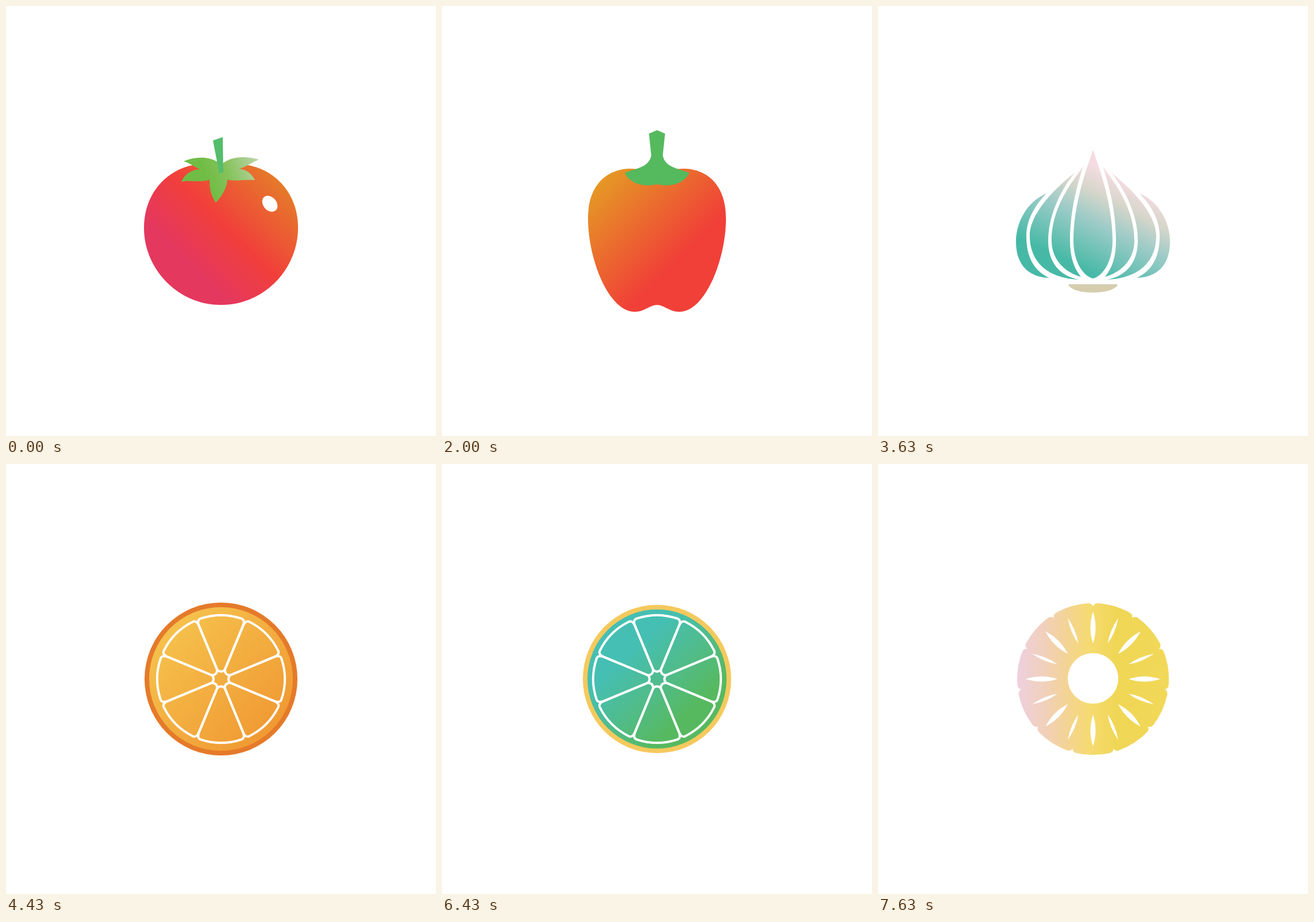
Animation of 748x748 px, one loop 8000 ms. Source, as an HTML page:

```html
<!DOCTYPE html>
<html lang="en">
<head>
<meta charset="utf-8">
<title>Fruit and vegetables</title>
<style>
html, body { margin: 0; width: 100%; height: 100%; overflow: hidden; background: #fff; }
svg { display: block; width: 100%; height: 100%; }
</style>
</head>
<body>
<svg id="stage" viewBox="0 0 748 748"></svg>
<script>
const SIZE = 748, MID = 374, LOOP = 8000;
let defs = '', gradCount = 0;

// line: "x1 y1 x2 y2"; stops: "color offset, color offset"
function grad(line, stops) {
  const [x1, y1, x2, y2] = line.split(' ');
  const id = 'g' + gradCount++;
  const inner = stops.split(', ').map(s => {
    const [color, offset] = s.split(' ');
    return `<stop offset="${offset}" stop-color="${color}"/>`;
  }).join('');
  defs += `<linearGradient id="${id}" gradientUnits="userSpaceOnUse" x1="${x1}" y1="${y1}" x2="${x2}" y2="${y2}">${inner}</linearGradient>`;
  return `url(#${id})`;
}

const path = (d, fill, more = '') => `<path d="${d}" fill="${fill}" ${more}/>`;
const line = (d, color, width) =>
  path(d, 'none', `stroke="${color}" stroke-width="${width}" stroke-linecap="round" stroke-linejoin="round"`);
const oval = (x, y, rx, ry, fill, turn = 0) =>
  `<ellipse cx="${x}" cy="${y}" rx="${rx}" ry="${ry}" fill="${fill}" transform="rotate(${turn} ${x} ${y})"/>`;
const disc = (x, y, r, fill) => oval(x, y, r, r, fill);
const mirror = d => d.replace(/([\d.]+) ([\d.]+)/g, (_, x, y) => `${SIZE - x} ${y}`);
const both = d => d + mirror(d);
const repeat = (n, draw) => Array.from({ length: n }, (_, i) => draw(i)).join('');
const centered = (content, turn = 0) =>
  `<g transform="translate(${MID} ${MID}) rotate(${turn})">${content}</g>`;

function roundTomato() {
  const skin = grad('315 445 465 295', '#e4385f 0, #f13f3b .43, #e57a2a 1');
  const leaf = grad('350 300 436 268', '#70bd45 0, #85c25a .4, #b9d4a6 1');
  return path('M374 520C298 520 240 457 240 386C240 325 281 283 330 276L416 276C467 283 508 325 508 386C508 457 450 520 374 520Z', skin) +
    path('M309 270C330 262 352 261 369 272L378 273C392 262 415 260 440 267C428 272 418 280 405 283C418 284 428 292 433 303C415 301 400 306 385 302C384 318 376 330 365 342C358 332 354 320 354 302C340 308 318 302 305 306C311 292 322 285 337 284C327 279 319 273 309 270Z', leaf) +
    path('M360 234L377 228L378 289L371 291Z', '#55bd6b') +
    oval(459, 344, 11.5, 15.5, '#fff', -40);
}

function cherries() {
  const skin = grad('260 470 480 350', '#e4385f 0, #f13f3b 1');
  return line('M307 355C315 300 340 250 374 219C400 255 432 300 441 355', '#5bb276', 9) +
    path('M374 219C400 212 445 222 462 262C420 268 388 250 374 219Z', '#7abb44') +
    disc(307, 412, 68, skin) + disc(441, 412, 68, skin) +
    oval(335, 388, 7, 10, '#fff', -40) + oval(469, 388, 7, 10, '#fff', -40);
}

function lemon() {
  const skin = grad('280 300 470 450', '#f2d75a 0, #f0b83c 1');
  return path(both('M374 268C318 268 278 300 262 345C257 358 237 360 237 374C237 388 257 390 262 403C278 448 318 480 374 480Z'), skin) +
    oval(440, 325, 9, 14, '#fff', -45);
}

function guava() {
  const flesh = grad('264 400 484 360', '#f9646e 0, #f77e8a 1');
  const rim = grad('270 340 480 400', '#cbba34 0, #b4ba38 .35, #78bb43 1');
  const seeds = [
    377,300, 361,300, 347,307, 335,317, 327,331, 323,346, 320,362, 317,377, 316,393, 317,409, 320,425,
    373,321, 358,324, 348,335, 344,350, 341,366, 338,381, 337,396,
    419,321, 428,333, 432,349, 429,364, 422,378, 413,391, 403,405, 392,417, 381,427, 368,436, 355,444,
    402,334, 410,346, 408,361, 400,374, 391,387, 381,398, 369,410
  ];
  return path('M370 243C390 243 408 249 421 257C462 268 488 310 488 350C488 385 465 420 440 446C410 478 372 504 340 505C333 504 328 497 321 496C316 496 313 498 309 495C304 493 305 487 299 485C294 483 288 484 285 480C270 463 259 428 260 394C261 355 270 318 283 292C300 259 335 243 370 243Z',
      flesh, `stroke="${rim}" stroke-width="8.5" stroke-linejoin="round"`) +
    path('M398 290C390 286 380 283 368 283C325 283 301 335 301 385C301 415 306 445 322 455ZM410 296C432 305 448 328 448 349C448 395 385 470 334 461Z', '#ee3a4d') +
    repeat(seeds.length / 2, i => disc(seeds[2 * i], seeds[2 * i + 1], 2.7, '#fff'));
}

function pear() {
  const skin = grad('280 460 460 330', '#7abb44 0, #cbba34 1');
  return line('M374 270C374 255 377 245 383 236', '#5bb276', 9) +
    path(both('M374 262C340 262 327 285 322 315C314 355 255 370 255 428C255 485 305 517 374 517Z'), skin) +
    oval(445, 405, 9, 14, '#fff', -30);
}

function pepper() {
  const skin = grad('270 300 470 500', '#e59b24 0, #f04038 .7');
  return path(both('M374 300C350 272 254 268 254 370C254 440 290 532 335 532C352 532 362 520 374 520Z'), skin) +
    path(both('M374 310C350 316 325 308 318 290C340 282 360 280 364 260L360 222L374 216Z'), '#55b95e');
}

function avocado() {
  const flesh = grad('374 240 374 520', '#8fc452 0, #e6dc7c .6');
  return path(both('M374 222C330 222 318 275 300 325C285 360 269 385 269 425C269 490 315 528 374 528Z'), '#4fae55') +
    path(both('M374 236C340 236 330 285 312 332C298 366 282 390 282 425C282 482 322 515 374 515Z'), flesh) +
    disc(374, 428, 50, grad('340 390 410 470', '#c98a52 0, #a8643f 1'));
}

function strawberry() {
  const skin = grad('330 400 478 365', '#f14239 0, #f25058 .45, #f0667b 1');
  const leaf = grad('270 340 480 325', '#58b549 0, #8cbb3b .45, #a8bb33 .65, #cdb329 1');
  const stem = grad('372 317 400 218', '#55b472 0, #66b06a 1');
  const rows = [6, 5, 4, 3];
  return path(both('M374 532C320 532 268 440 268 375C268 350 284 333 300 333L374 333Z'), skin) +
    rows.map((n, r) => repeat(n, i =>
      oval(MID + (i - [2.5, 2, 1.5, 1][r]) * 35.1, 393 + r * 30.3, 3.6, 7.8, '#f6b674'))).join('') +
    path('M265 337C285 315 312 305 342 307C338 301 332 297 325 295C345 288 362 292 373 304C388 290 404 288 423 295C416 297 410 301 406 306C440 306 465 316 483 337C465 333 450 332 430 336C440 350 440 365 420 377C412 355 395 338 374 338C350 338 338 355 328 377C308 365 308 350 318 335C300 333 282 334 265 337Z', leaf) +
    path('M370 317C364 285 360 250 372 230C378 220 390 215 398 216L402 227C388 228 380 235 375 247C369 270 371 295 376 315C375 318 371 318 370 317Z', stem);
}

function pumpkin() {
  const tones = ['#e57a2a', '#ec8a2c', '#f09a33'];
  return path('M360 300L358 250L380 244L386 300Z', '#55b95e') +
    tones.map((c, i) => oval(MID, 395, 135 - i * 45, 110, c)).join('');
}

function garlic() {
  const skin = grad('374 276 297 429', '#f5dce2 0, #d6d6ca .24, #9ccbc7 .52, #46b9a6 1');
  const cloves = [
    'M374 250C366 275 340 340 340 408C340 445 357 470 374 474Z',
    'M357 279C345 297 302 345 302 408C302 445 330 465 353 471C340 455 334 435 334 408C334 360 345 315 357 279Z',
    'M342 290C320 308 264 355 264 400C264 445 295 474 350 476C315 470 296 445 296 408C296 360 322 315 342 290Z',
    'M293 326C260 340 240 375 240 410C240 450 262 472 298 473C270 460 258 435 258 400C258 370 275 345 293 326Z'
  ];
  return path(both(cloves.join('')), skin) +
    path(both('M374 484L333 484C331 484 331 486 332 487C340 495 355 498.5 374 498.5Z'), '#d6cdaf');
}

function pineapple() {
  const skin = grad('300 370 440 560', '#f2d75a 0, #e59b24 1');
  const leaf = grad('374 171 374 350', '#58b549 0, #8cbb3b 1');
  return path(both('M374 171C358 205 354 235 356 255C345 232 330 220 312 214C322 240 330 262 338 285C325 275 310 272 294 274C315 295 325 330 340 356L374 356Z'), leaf) +
    oval(MID, 460, 97, 118, skin) +
    repeat(5, r => repeat(4 - r % 2, i =>
      oval(MID + (i - (3 - r % 2) / 2) * 42, 388 + r * 36, 4, 8, '#d9802a')));
}

function citrus(radius, rind, flesh) {
  const wedge = line('M-38.3 -92.4Q-42.5 -103 -35 -105.3A111 111 0 0 1 35 -105.3Q42.5 -103 38.3 -92.4L6.5 -15.7Q0 -10 -6.5 -15.7Z', '#fff', 4);
  return disc(MID, MID, radius, rind) + disc(MID, MID, radius - 8, flesh) +
    repeat(8, i => centered(wedge, i * 45));
}

function kiwi() {
  return disc(MID, MID, 131, '#b08a52') + disc(MID, MID, 123, grad('290 290 460 460', '#8fc452 0, #58b549 1')) +
    oval(MID, MID, 42, 42, '#e3e8b4') +
    repeat(24, i => centered('<ellipse cy="-60" rx="3" ry="7" fill="#3c4a36"/>', i * 15));
}

function wideTomato() {
  const skin = grad('290 315 380 405', '#e49a24 0, #e98029 .4, #f04237 1');
  const leaf = 'M288 256C303 270 308 290 319 301L366 300C345 290 336 276 331 260C331 276 336 288 344 295C322 292 312 271 288 256Z';
  return path(leaf, grad('290 260 366 300', '#68bd45 0, #4cbb50 1')) +
    path(mirror(leaf), grad('382 300 460 256', '#a9c53f 0, #8ac043 1')) +
    path('M369 240L380 245L382 300L366 300Z', '#4fbb50') +
    path('M375.5 243L380 245L382 300L376 300Z', '#a2b83a') +
    path('M375.5 243L377.5 244L378.5 300L376 300Z', '#e2a52c') +
    path(both('M374 299C290 299 244 325 244 397C244 455 300 507 374 507Z'), skin);
}

function fig() {
  const skin = grad('300 480 440 300', '#7d4a8c 0, #a55f97 .6, #8fb45a 1');
  return path(both('M374 231C355 231 362 270 340 300C300 330 266 360 266 415C266 480 315 518 374 518Z'), skin) +
    oval(440, 390, 8, 13, '#fff', -30);
}

function peach() {
  const skin = grad('290 450 460 310', '#f0667b 0, #f6a04f 1');
  return line('M374 290L374 249', '#5bb276', 9) +
    path('M374 280C390 250 425 244 455 256C440 285 405 296 374 280Z', '#7abb44') +
    oval(MID, 390, 108, 115, skin) +
    line('M374 277C345 315 345 365 362 405', '#ee5a6c', 5);
}

function carrot() {
  const skin = grad('330 300 420 400', '#ef8f2c 0, #f0642f 1');
  const leaf = grad('300 200 440 280', '#58b549 0, #a2c03c 1');
  return path(both('M374 174C352 205 350 230 354 252C340 222 315 208 285 205C298 245 325 270 362 285L374 285Z'), leaf) +
    path(both('M374 270C315 262 320 310 328 350C340 430 360 574 374 574Z'), skin) +
    line('M330 330L362 334M415 365L388 369M342 410L366 413M398 455L380 458', '#d9582a', 4);
}

function aubergine() {
  const skin = grad('300 500 450 330', '#54408c 0, #8a4f9b 1');
  return path(both('M374 255C335 255 330 310 315 365C300 400 285 430 285 465C285 520 325 548 374 548Z'), skin) +
    path(both('M374 330C368 315 362 305 356 296C346 304 336 312 326 326C326 280 340 258 364 252L362 204L374 200Z'), '#55b95e') +
    oval(432, 440, 8, 20, '#fff', -10);
}

function pineappleRing() {
  const flesh = grad('246 374 506 374', '#eed0dc 0, #f1d0b8 .18, #f4d491 .33, #f5db70 .47, #f0d655 .65, #f2d858 1');
  const step = 2 * Math.PI / 11;
  const at = (r, a) => `${(MID + r * Math.sin(a)).toFixed(1)} ${(MID - r * Math.cos(a)).toFixed(1)}`;
  let rim = 'M' + at(126, 0);
  for (let a = 0; a < 2 * Math.PI - 0.01; a += step) {
    const end = a + step;
    rim += `Q${at(131.5, a + 0.012)} ${at(132, a + 0.06)}A132 132 0 0 1 ${at(132, end - 0.06)}Q${at(131.5, end - 0.012)} ${at(126, end)}`;
  }
  const slit = i => centered(i % 2
    ? path('M0 -67Q5.5 -88 0 -115Q-5.5 -88 0 -67Z', '#fff')
    : path('M0 -62Q9 -89 0 -117Q-9 -89 0 -62Z', '#fff'), i * 22.5);
  return path(rim + 'Z', flesh) + disc(MID, 373, 44, '#fff') + repeat(16, slit);
}

const orangeSlice = () => citrus(133, '#e57a2a', grad('290 290 460 460', '#f5c04c 0, #f09a33 1'));
const limeSlice = () => citrus(129, '#f5c95d', grad('330 325 430 430', '#45bfb3 0, #50bc8c .5, #56b960 1'));

const scenes = [
  [0, roundTomato], [400, cherries], [800, lemon], [1200, guava], [1600, pear],
  [2000, pepper], [2400, avocado], [2800, strawberry], [3200, pumpkin], [3630, garlic],
  [4030, pineapple], [4430, orangeSlice], [4830, kiwi], [5230, wideTomato], [5630, fig],
  [6030, peach], [6430, limeSlice], [6830, carrot], [7230, aubergine], [7630, pineappleRing]
];

const stage = document.getElementById('stage');
const body = scenes.map(([, draw]) => `<g class="scene" display="none">${draw()}</g>`).join('');
stage.innerHTML = `<defs>${defs}</defs>${body}`;
const groups = [...stage.querySelectorAll('.scene')];

function render(time) {
  const t = time % LOOP;
  const current = scenes.filter(([start]) => start <= t).length - 1;
  groups.forEach((g, i) => g.setAttribute('display', i === current ? 'inline' : 'none'));
}

const begin = performance.now();
function tick() {
  render(performance.now() - begin);
  requestAnimationFrame(tick);
}
tick();
</script>
</body>
</html>
```
